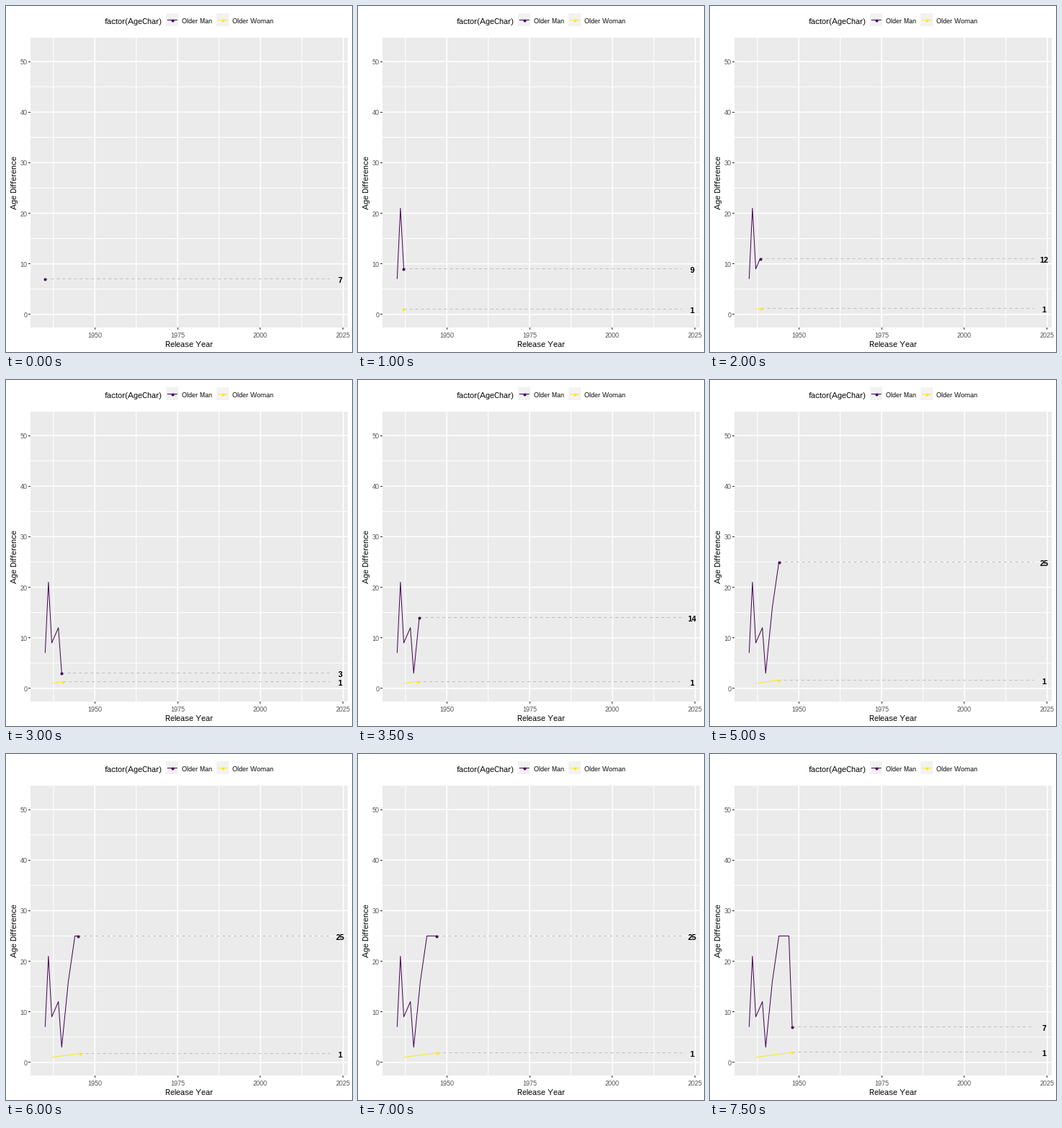
Animation of 480 by 480 pixels, one loop 8000 ms. Source, as a matplotlib script:

```python
import matplotlib.pyplot as plt
import numpy as np
from matplotlib.animation import FuncAnimation
from matplotlib.patches import Rectangle

SIZE, DPI = 480, 72  # at 72 dpi one point is one pixel
FRAMES, INTERVAL = 16, 500
PURPLE, YELLOW = "#440154", "#FDE725"

plt.rcParams.update({
    "font.family": "Liberation Sans",
    "text.hinting": "native",
    "text.hinting_factor": 1,
    "path.snap": False,
})


def px(year):
    return 123.2 + 4.594 * (year - 1950)


def py(value):
    return 427.8 - 7.015 * value


def mid(v):
    """Centre of the pixel that holds v."""
    return np.floor(v) + 0.5


fig = plt.figure(figsize=(SIZE / DPI, SIZE / DPI), dpi=DPI, facecolor="white")
ax = fig.add_axes([0, 0, 1, 1])
ax.set(xlim=(0, SIZE), ylim=(SIZE, 0))
ax.axis("off")


def box(x, y, w, h, color):
    ax.add_patch(Rectangle((x, y), w, h, fc=color, lw=0, zorder=0))


def line(x, y, color, width=1, **kw):
    kw.setdefault("solid_capstyle", "butt")
    return ax.plot(x, y, color=color, lw=width, **kw)[0]


def label(x, y, s, size=9, color="black", **kw):
    return ax.text(x, y, s, size=size, color=color, va="baseline", **kw)


def dot(x, y, color):
    return ax.plot(x, y, "o", ms=4, mfc=color, mew=0, zorder=4)[0]


def draw_panel():
    box(34, 44, 440, 402, "#EBEBEB")
    for year in np.arange(1937.5, 2026, 12.5):
        x, major = px(year), year % 25 == 0
        line([x, x], [44, 446], "white", 1.6 if major else 1.1, zorder=1)
        if major:
            line([mid(x)] * 2, [446, 449], "#333333")
            label(x, 460, f"{year:.0f}", color="#4D4D4D", ha="center")
    for value in range(0, 51, 5):
        y, major = py(value), value % 10 == 0
        line([34, 474], [y, y], "white", 1.6 if major else 1.1, zorder=1)
        if major:
            line([31, 34], [mid(y)] * 2, "#333333")
            label(29.5, round(y) + 4, str(value), color="#4D4D4D", ha="right")
    label(254, 473, "Release Year", 11, ha="center")
    ax.text(12, 245, "Age Difference", size=11, rotation=90,
            ha="center", va="center")


def draw_legend():
    label(136.5, 25, "factor(AgeChar)", 11)
    for x, color, name in ((222, PURPLE, "Older Man"), (292, YELLOW, "Older Woman")):
        box(x, 10, 17, 18, "#F2F2F2")
        line([x + 1.7, x + 15.6], [19.5, 19.5], color, zorder=3)
        dot([x + 8.5], [19.5], color)
        label(x + 22, 24, name)


class Series:
    """A line revealed point by point, led by a dot, a dashed guide and a number."""

    def __init__(self, color, steps, years, values):
        self.steps, self.years, self.values = map(np.array, (steps, years, values))
        self.path = line([], [], color, zorder=3)
        self.guide = line([], [], "#BEBEBE", zorder=2,
                          dashes=(4, 4), dash_capstyle="butt")
        self.head = dot([], [], color)
        self.text = label(463.7, 0, "", 11, weight="bold", ha="center", zorder=5)
        self.artists = [self.path, self.guide, self.head, self.text]

    def update(self, i):
        shown = i >= self.steps[0]
        for artist in self.artists:
            artist.set_visible(bool(shown))
        if not shown:
            return
        past = self.steps <= i
        year = np.interp(i, self.steps, self.years)
        value = np.interp(i, self.steps, self.values)
        x, y = px(year), py(value)
        self.path.set_data(px(np.append(self.years[past], year)),
                           py(np.append(self.values[past], value)))
        self.guide.set_data([x, px(2021)], [mid(y), mid(y)])
        self.head.set_data([x], [mid(y)])
        # The number flips halfway between two data points.
        nearest = int(np.floor(np.interp(i, self.steps, np.arange(len(self.steps))) + 0.5))
        self.text.set_text(f"{int(self.values[nearest])}")
        self.text.set_y(round(y + 5.5))


draw_panel()
draw_legend()

man = Series(PURPLE,
             [0, 1, 2, 5, 6, 7, 8, 10, 12, 14, 15],
             [1935, 1936, 1937, 1939, 1940, 1941.7, 1942, 1944, 1945, 1947, 1948],
             [7, 21, 9, 12, 3, 14, 16, 25, 25, 25, 7])
woman = Series(YELLOW, [2, 30], [1937, 1960.8], [1, 3.15])


def update(i):
    man.update(i)
    woman.update(i)
    return man.artists + woman.artists


anim = FuncAnimation(fig, update, frames=FRAMES, interval=INTERVAL,
                     repeat=True, repeat_delay=0, blit=False)
plt.show()
```
